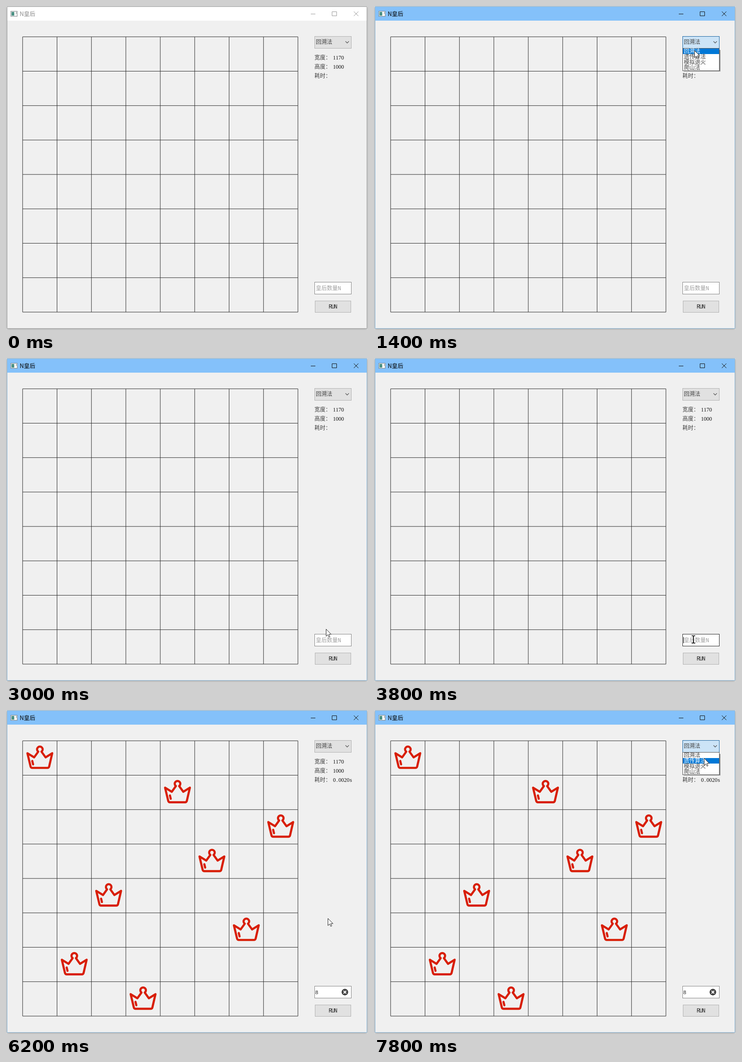
Animation of 791x708 px, one loop 8000 ms. Source, as an HTML page with a canvas:

```html
<!DOCTYPE html>
<html lang="zh-CN">
<head>
<meta charset="utf-8">
<style>
html, body { margin: 0; width: 100%; height: 100%; overflow: hidden; background: #e0e0e0; }
canvas { display: block; }
</style>
</head>
<body>
<canvas id="stage" width="791" height="708"></canvas>
<script>
const c = document.getElementById('stage').getContext('2d');
const CJK = '"Noto Sans CJK SC", "Noto Sans CJK", sans-serif';
const LOOP = 8000, STEP = 100, N = 8, CELL = 75.2;
const LEFT = 36.3, TOP = 67.3, BLUE = '#1f86d4';
const methods = ['回溯法', '遗传算法', '模拟退火', '爬山法'];

// First solution by backtracking: one column per row
function solve(cols = []) {
  const row = cols.length;
  if (row === N) return cols;
  for (let x = 0; x < N; x++) {
    if (cols.some((q, r) => q === x || Math.abs(q - x) === row - r)) continue;
    const found = solve([...cols, x]);
    if (found) return found;
  }
  return null;
}
const queens = solve();

// Places the pointer visits, and when it sets off and arrives
const entry = { x: 787, y: 37 }, combo = { x: 719, y: 81 };
const legs = [
  { from: 200, to: 500, ...combo },
  { from: 900, to: 1400, x: 700, y: 97 },
  { from: 1750, to: 3100, x: 699, y: 600 },
  { from: 3100, to: 3500, x: 698, y: 615 },
  { from: 4500, to: 5000, x: 715, y: 648 },
  { from: 5100, to: 5300, x: 716, y: 656 },
  { from: 5900, to: 6560, x: 686, y: 190 },
  { from: 6700, to: 7200, ...combo },
  { from: 7300, to: 7600, x: 721, y: 105 }
];

function pointerAt(t) {
  if (t < legs[0].from) return null;
  let { x, y } = entry;
  for (const leg of legs) {
    const k = Math.max(0, Math.min(1, (t - leg.from) / (leg.to - leg.from)));
    const ease = k * k * (3 - 2 * k);
    x += (leg.x - x) * ease;
    y += (leg.y - y) * ease;
  }
  return { x: Math.round(x), y: Math.round(y) };
}

function box(x, y, w, h, fill, line) {
  c.fillStyle = fill;
  c.fillRect(x, y, w, h);
  if (!line) return;
  c.lineWidth = 1;
  c.strokeStyle = line;
  c.strokeRect(x + .5, y + .5, w - 1, h - 1);
}

function stroke(d, color, width = 1) {
  c.strokeStyle = color;
  c.lineWidth = width;
  c.stroke(new Path2D(d));
}

function text(s, x, y, color = '#404040', font = '300 12px ' + CJK) {
  c.font = font;
  c.fillStyle = color;
  c.fillText(s, x, y);
}

// Half-width characters on a 6 px pitch
function digits(s, x, y) {
  c.textAlign = 'center';
  [...s].forEach((ch, i) => text(ch, x + 3 + 6 * i, y, '#111', '12px "Liberation Serif", serif'));
  c.textAlign = 'left';
}

function latin(s, x, y, color) {
  c.letterSpacing = '-1.2px';
  text(s, x, y, color, '12px "Liberation Mono", monospace');
  c.letterSpacing = '0px';
}

function drawWindow(active) {
  box(0, 0, 791, 708, '#dfe0e0');
  c.save();
  c.shadowColor = 'rgba(0,0,0,.35)';
  c.shadowBlur = 5;
  c.shadowOffsetY = 1;
  box(2, 1, 787, 704, '#f0f0f0');
  c.restore();
  box(2, 1, 787, 704, '#f0f0f0', active ? '#8ebbdd' : '#a8a8a8');
  box(3, 2, 785, 30, active ? '#84c1fa' : '#fff');

  box(10, 11, 15, 12, '#f8f8f8', '#7d8488');
  box(12, 13, 6, 8, '#4b9184');
  box(22, 13, 1, 4, '#7d8488');
  text('N皇后', 30, 21.5, active ? '#000' : '#8a8a8a', '12.5px ' + CJK);
  stroke('M666 17.5h10M712.5 12.5h10v9h-10zM760 12l10 10M770 12l-10 10', active ? '#111' : '#999');
}

function drawBoard() {
  let d = '';
  for (let i = 0; i <= N; i++) {
    d += `M${LEFT + CELL * i} ${TOP}v${CELL * N}M${LEFT} ${TOP + CELL * i}h${CELL * N}`;
  }
  stroke(d, '#2a2a2a');
}

function drawCrown(col, row) {
  c.save();
  c.translate(CELL * col, CELL * row);
  c.lineJoin = c.lineCap = 'round';
  stroke('M70.5 91A6.1 6.1 0 1 1 77.5 91L86.5 103.5L101 94.5L94.3 123.5Q93.5 126.5 90.5 126.5' +
    'H57.5Q54.5 126.5 53.7 123.5L46.8 94.5L61.5 103.5ZM57.4 111.5L59.2 118.8', '#d81e06', 4.7);
  c.restore();
}

function drawPopup(selected) {
  box(677, 96, 80, 47, 'rgba(0,0,0,.4)');
  box(674, 92, 81, 50, '#fff', '#555');
  methods.forEach((name, i) => {
    const on = i === selected;
    if (on) box(675, 93 + 12 * i, 79, 12, '#0078d7');
    text(name, 677, 103 + 12 * i, on ? '#fff' : undefined);
  });
}

function drawClear(alpha) {
  c.globalAlpha = alpha;
  c.fillStyle = '#404040';
  c.beginPath();
  c.arc(740.5, 616.5, 7.2, 0, 7);
  c.fill();
  stroke('M737.5 613.5l6 6m0 -6l-6 6', '#fff', 2);
  c.globalAlpha = 1;
}

function drawPointer({ x, y }, beam) {
  c.save();
  c.translate(x, y);
  if (beam) {
    stroke('M-4 -8H-1L0 -7L1 -8H4M0 -7V7M-4 8H-1L0 7L1 8H4', '#000', 1.7);
  } else {
    const d = 'M.5 .5V16L4.2 12.6L6.6 17.8L8.9 16.8L6.6 11.8H11.6Z';
    c.fillStyle = '#fff';
    c.fill(new Path2D(d));
    stroke(d, '#222');
  }
  c.restore();
}

function draw(t) {
  const p = pointerAt(t), between = (a, b) => t >= a && t < b;
  const over = (y, h) => p && p.x >= 674 && p.x < 755 && p.y >= y && p.y < y + h;
  const button = (down, hot) => down ? ['#cce4f7', '#1b65a2']
    : hot ? ['#e5f1fb', BLUE] : ['#e1e1e1', '#b2b2b2'];
  const open = between(900, 1800) || t >= 7300;
  const typed = t >= 4200, solved = t >= 5600;
  const focus = between(3800, 5500), inField = over(603, 27);

  drawWindow(t >= 700);
  drawBoard();
  if (solved) queens.forEach(drawCrown);

  box(674, 66, 81, 27, ...button(open, over(66, 27)));
  text(methods[0], 677, 83);
  stroke('M741.8 77.2l3.7 3.7l3.7 -3.7', '#444', 1.1);

  ['宽度：', '高度：', '耗时：'].forEach((label, i) => text(label, 674, 117 + 20 * i));
  ['1170', '1000', solved ? '0.0020s' : ''].forEach((value, i) => digits(value, 714.5, 117 + 20 * i));

  box(674, 603, 81, 27, '#fff', inField ? '#2a2a2a' : focus ? BLUE : '#858585');
  if (typed) {
    digits('8', 676, 621);
    drawClear(Math.min(1, (t - 4100) / 300));
  } else {
    text('皇后数量', 677, 621, '#a0a0a0');
    latin('N', 725, 621, '#a0a0a0');
  }
  if (between(3800, 4900) || between(5200, 5500)) box(typed ? 682 : 676, 610, 1, 13, '#000');

  box(675, 644, 79, 26, ...button(between(5500, 5700), over(644, 26)));
  latin('RUN', 705, 661, '#222');

  if (open) drawPopup(Math.max(0, Math.floor((p.y - 93) / 12)));
  if (p) drawPointer(p, inField);
}

const start = performance.now();
function tick() {
  const t = (performance.now() - start) % LOOP;
  draw(Math.floor(t / STEP) * STEP);
  requestAnimationFrame(tick);
}
tick();
</script>
</body>
</html>
```
